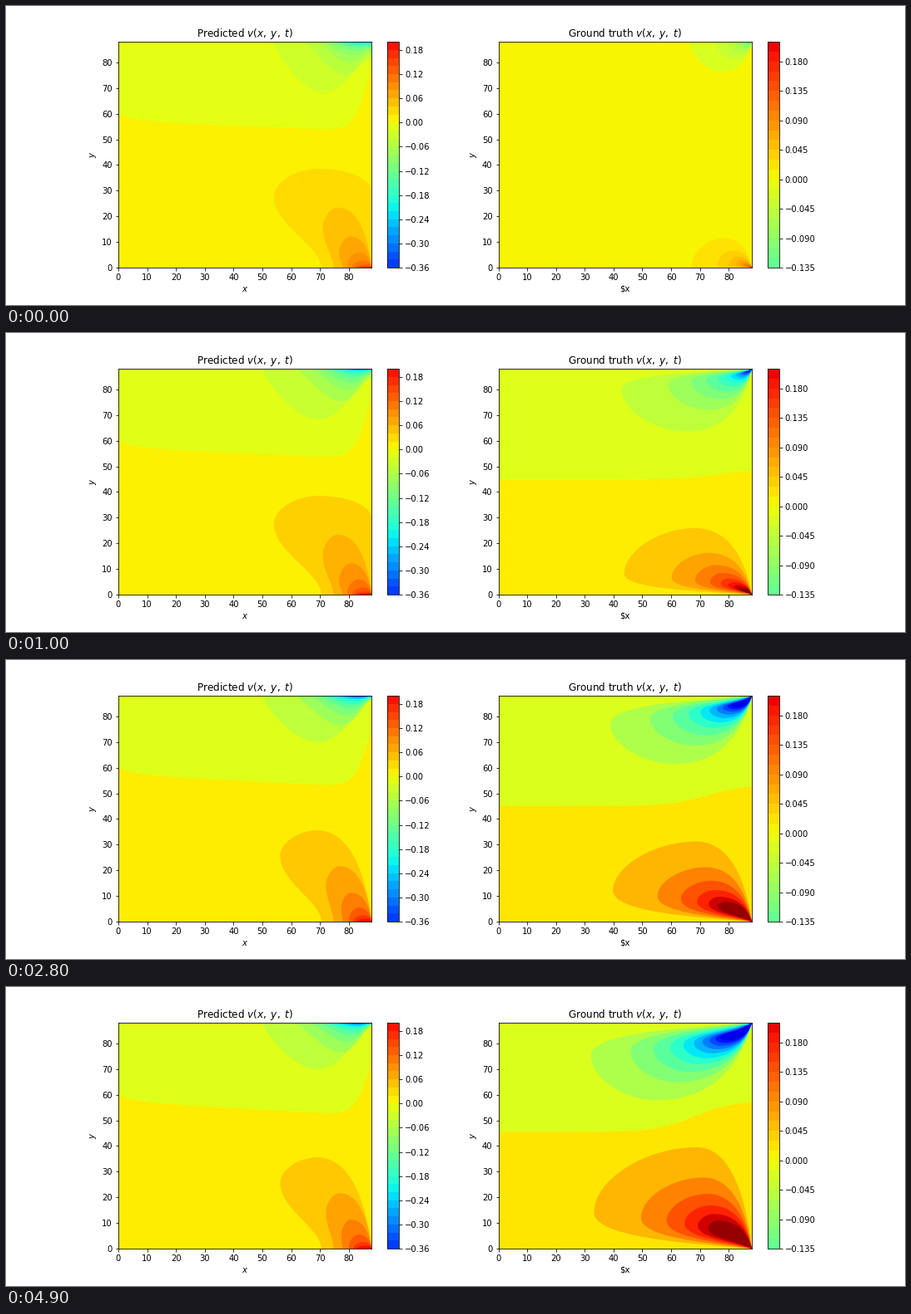
These frames come from a looping animation (1080x360 px, 5 s). A matplotlib script:

```python
import numpy as np
import matplotlib.pyplot as plt
from matplotlib.animation import FuncAnimation
from matplotlib.colors import Normalize
from matplotlib.patches import PathPatch, Polygon
from matplotlib.path import Path

FRAMES, INTERVAL = 50, 100
SIZE = 88
SWITCH = 1.25  # seconds until the contour spacing widens
jet = plt.get_cmap("jet")
norm = Normalize(-0.492, 0.277, clip=True)
live = []


def color(v):
    return jet(norm(v))


def approach(start, end, t, tau):
    return end + (start - end) * np.exp(-t / tau)


def setup(ax, title, xlabel, lo, hi, step):
    levels = np.round(np.arange(lo, hi + step / 2, step), 3) + 0.0
    cs = ax.contourf([0, SIZE], [0, SIZE], np.zeros((2, 2)), levels=levels,
                     cmap=jet, vmin=norm.vmin, vmax=norm.vmax)
    fig.colorbar(cs, ax=ax, ticks=levels[::3])
    cs.set_visible(False)
    ax.set(xlim=(0, SIZE), ylim=(0, SIZE), xlabel=xlabel, ylabel="$y$",
           xticks=range(0, SIZE, 10), yticks=range(0, SIZE, 10))
    ax.set_title(title)


def fill(ax, x, y, v):
    patch = Polygon(np.column_stack([x, y]), facecolor=color(v), lw=0)
    live.append(ax.add_patch(patch))


def halves(ax, x, y, step):
    """Two background bands, split along the zero line."""
    ax.set_facecolor(color(step / 2))
    fill(ax, np.append(x, [SIZE, 0]), np.append(y, [SIZE, SIZE]), -step / 2)


def lobe(ax, v, far, top, lead, bend, foot=0, head=0):
    """Contour loop at a right-hand corner; offsets run inward from it."""
    (fx, fy), (tx, ty) = far, top
    r = 0.5
    pts = np.array([
        (foot, 0), lead, (fx, bend * fy), far,
        (fx, fy + r * (ty - fy)), (tx + r * (fx - tx), ty), top,
        (tx / 2, ty), (0.14 * tx, head + 0.67 * (ty - head)), (0, head),
        (0, 0), (0, 0)])
    x, y = SIZE - pts[:, 0], pts[:, 1]
    codes = [Path.MOVETO] + [Path.CURVE4] * 9 + [Path.LINETO, Path.CLOSEPOLY]
    path = Path(np.column_stack([x, y if v > 0 else SIZE - y]), codes)
    live.append(ax.add_patch(PathPatch(path, facecolor=color(v), lw=0)))


def draw_predicted(t):
    late = t > SWITCH
    step = 0.03 if late else 0.025 if t else 0.02

    x = np.linspace(0, SIZE, 120)
    wall = np.exp(-((SIZE - x) / 4.3) ** 1.3)
    slope = 0.048 + 0.003 * t
    halves(left, x, 57.3 - slope * x + 2.6 * np.exp(-x / 6) + (25 - t) * wall,
           step)

    # Positive lobe, rising from the bottom edge
    width, rise = (31.8, 35.6) if late else (34, 38.5)
    for k in range(int(0.2 / step)):
        reach = width / (k + 1)
        foot = min(17.5 * 0.76 ** k, reach)
        height = rise * np.exp(-0.5 * k ** 1.2)
        side = height * max(0.72 - 0.07 * k * k, 0.1)
        top = min(19 * 0.62 ** k, 0.7 * reach)
        head = 0 if late or k else 31
        lobe(left, (k + 1.5) * step, (reach, side), (top, height),
             (foot, 0.3 * side), 0.6, foot, head)

    # Negative lobe, hanging from the top edge
    width = approach(34, 38, t, 0.3)
    depth = 18.3 if late else 20
    tail = approach(8, 1.3, t, 1.2)
    u = np.linspace(0, 1, 90)
    for k in range(round(approach(0.28, 0.36, t, 0.6) / step)):
        skew = 1.1 + 0.35 * min(k, 1)
        arch = np.abs(np.sin(np.pi * u ** skew)) ** 0.7
        drop = ((1 - u ** 6) * depth * 0.65 ** k * arch
                + u ** 6 * tail * 0.75 ** k)
        x = SIZE - width * (k + 1) ** -0.55 * (1 - u)
        fill(left, np.append(x, SIZE), SIZE - np.append(drop, 0),
             -(k + 1.5) * step)


def wall_lobes(sign, step, peak, reach, decay, side, top, height, turn):
    """Nested loops; turn holds the change of side, top and height per level."""
    for k in range(int(peak / step + 0.01)):
        r = reach * np.exp(-decay * k ** 0.8)
        h = height + turn[2] * k
        s = min(side + turn[0] * k, 0.85 * h)
        p = min(top + turn[1] * k, 0.78)
        lead = (0.45 * r, (0.15 + 0.06 * k) * s * r)
        lobe(right, sign * (k + 1.5) * step, (r, s * r), (p * r, h * r),
             lead, min(0.33 + 0.04 * k, 0.6))


def draw_truth(t):
    step = 0.04 if t > SWITCH else min(0.015 + 0.05 * t, 0.03)

    if t:
        x = np.linspace(0, SIZE, 100)
        ramp = 1 / (1 + np.exp((79 - 2.2 * t - x) / 7))
        halves(right, x, 44.6 + 0.17 * t + 4.2 * t ** 0.68 * ramp, step)
    else:
        right.set_facecolor(color(step / 2))

    reach = 38 * (t + 0.008) ** 0.23 * (0.04 / step) ** 0.53
    wall_lobes(1, step, approach(0.2, 0.27, t, 0.1), reach,
               approach(0.56, 0.34, t, 1.8), approach(0, 0.26, t, 0.85),
               0.47 - 0.025 * t, 0.55 + 0.035 * t, (0.055, 0.09, 0))
    wall_lobes(-1, step, approach(0.12, 0.4, t, 0.4), 1.02 * reach,
               approach(0.55, 0.25, t, 2.2), approach(0, 0.225, t, 0.7),
               0.465 + 0.027 * t, 0.54, (0.035, 0.02, 0.01))


def update(i):
    while live:
        live.pop().remove()
    t = i * INTERVAL / 1000
    draw_predicted(t)
    draw_truth(t)
    return []


fig, (left, right) = plt.subplots(1, 2, figsize=(15, 5), dpi=72)
fig.subplots_adjust(left=0.125, right=0.9, bottom=0.125, top=0.88, wspace=0.2)
setup(left, r"Predicted $v(x,\;y,\;t)$", "$x$", -0.36, 0.20, 0.02)
setup(right, r"Ground truth $v(x,\;y,\;t)$", "$x", -0.135, 0.21, 0.015)

anim = FuncAnimation(fig, update, frames=FRAMES, interval=INTERVAL,
                     init_func=lambda: update(0), repeat=True, repeat_delay=0)
plt.show()
```
